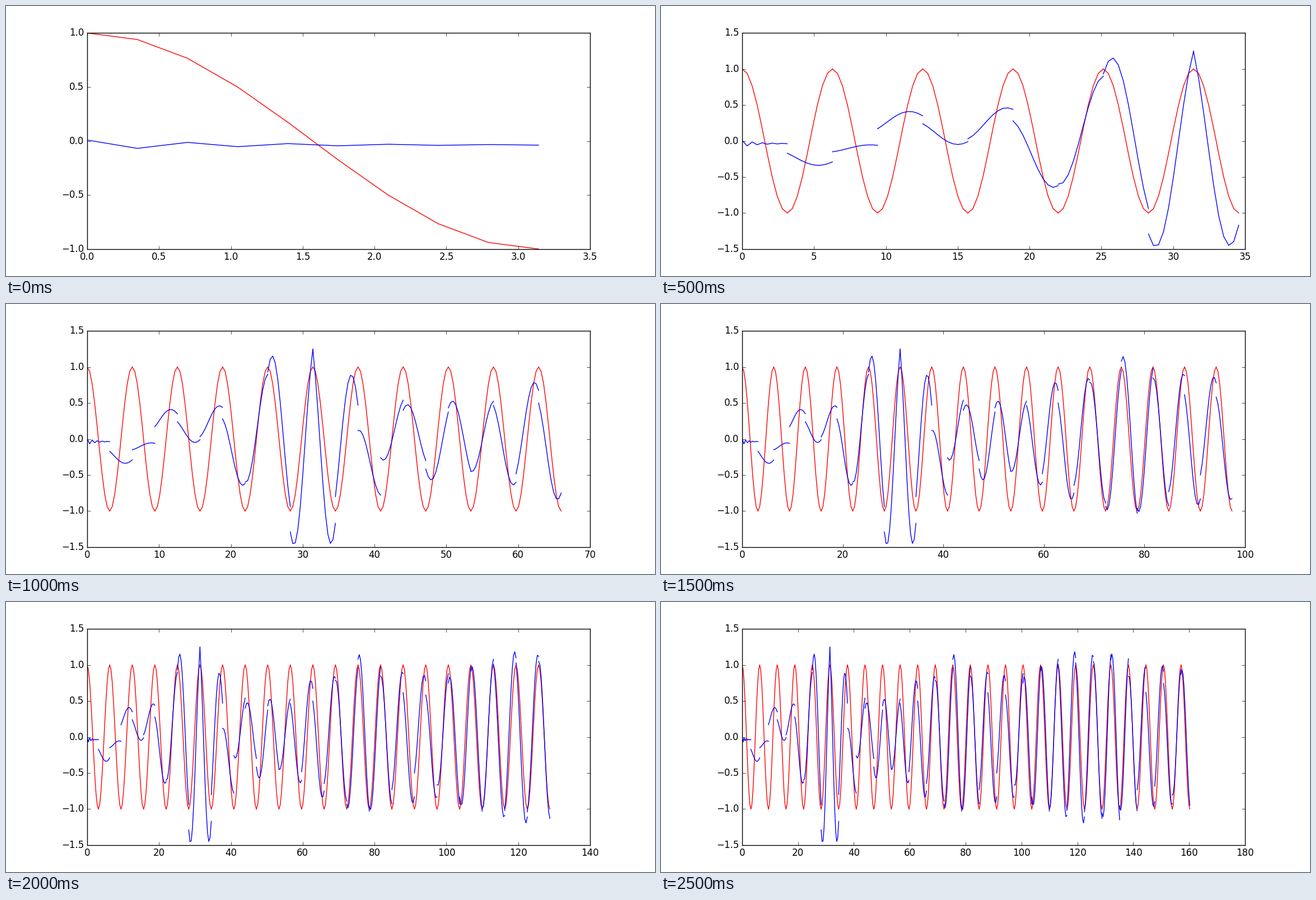
A matplotlib script that plays this animation: 1159 by 483 pixels, repeating every 3 s.

```python
import math

import matplotlib.pyplot as plt
import numpy as np
from matplotlib.animation import FuncAnimation

plt.style.use("classic")

DPI = 100
STEPS = 10  # samples per half period
TICKS = [0.5, 5, 10, 20, 20, 20]

# Start, middle and end of the first swings, relative to a falling cosine.
OPENING = [
    (0.17, 0.32, 0.29), (-0.15, -0.08, -0.06), (-0.17, -0.38, -0.35),
    (0.24, 0.01, -0.01), (-0.03, -0.33, -0.44), (0.28, -0.32, -0.62),
    (0.6, -0.08, -0.9), (0.93, 0.68, -0.94), (1.29, 0.72, -1.25),
    (1.24, -0.84, -1.17), (0.8, -0.68, -0.47),
]
# Later swings swell and fade between these turning points.
TURNS = [12, 14, 20, 24, 29, 35, 42, 46, 50]
STARTS = [0.12, 0.4, 0.5, 1.08, 0.5, 1.0, 1.07, 0.62, 0.87]
ENDS = [-0.78, -0.3, -0.75, -1.03, -0.78, -1.08, -1.15, -0.9, -0.95]

u = np.linspace(0, 1, STEPS)
ease = (1 - np.cos(math.pi * u)) / 2


def prediction(k):
    if k == 0:
        return -0.036 + 0.045 * np.exp(-3 * u) * np.cos(9 * math.pi * u)
    if k <= len(OPENING):
        start, mid, end = OPENING[k - 1]
    else:
        start = np.interp(k, TURNS, STARTS)
        mid = -0.05 + 0.45 * math.cos(2 * math.pi * (k - 15) / 9)
        end = np.interp(k, TURNS, ENDS)
    bulge = mid - (start + end) / 2
    return (-1) ** k * (start + (end - start) * ease + bulge * np.sin(math.pi * u))


fig, ax = plt.subplots(figsize=(1159 / DPI, 483 / DPI), dpi=DPI, facecolor="white")
fig.subplots_adjust(left=0.125, right=0.9, bottom=0.1, top=0.9)


def draw(frame):
    ax.clear()
    count = 10 * frame + 1
    for k in range(count):
        x = math.pi * (k + u)
        ax.plot(x, np.cos(x), "r-")
        ax.plot(x, prediction(k), "b-")

    tick = TICKS[frame]
    right = math.ceil(count * math.pi / tick) * tick
    top = 1.5 if frame else 1.0
    ax.set_xticks(np.arange(0, right + tick / 2, tick))
    ax.set_yticks(np.arange(-top, top + 0.25, 0.5))
    ax.set_xlim(0, right)
    ax.set_ylim(-top, top)
    return ax.lines


anim = FuncAnimation(fig, draw, frames=len(TICKS), init_func=lambda: [],
                     interval=500, repeat=True, repeat_delay=0, blit=False)
plt.show()
```
